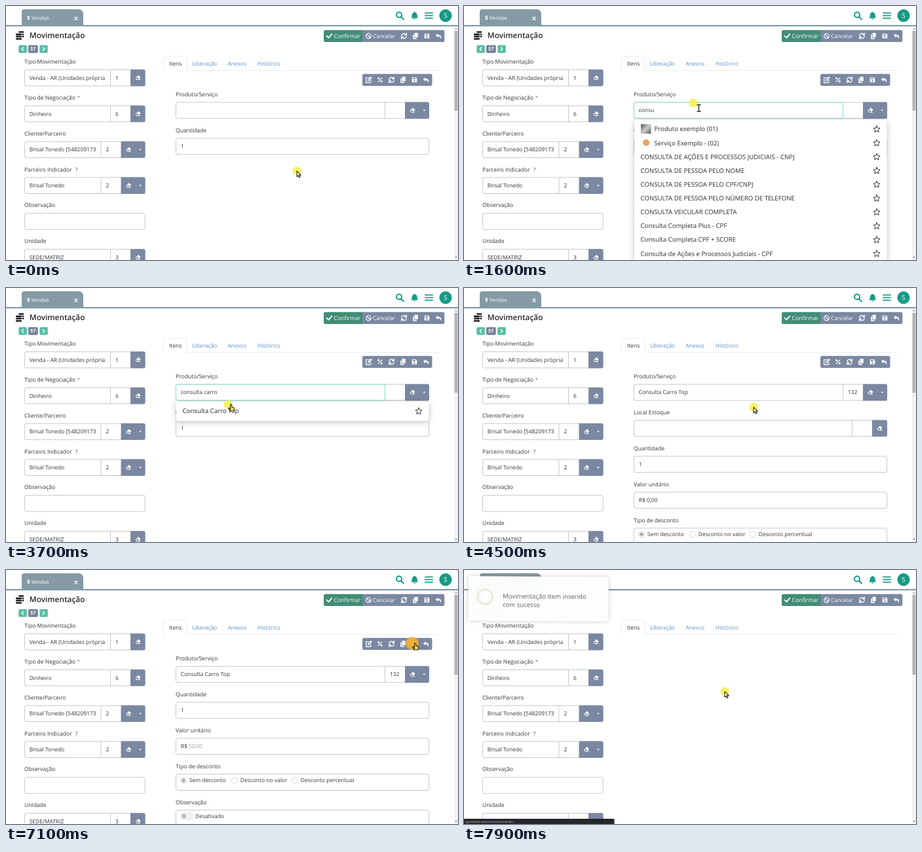
Recreate the animation shown at these times as an HTML page with a canvas. Size 690 px wide and 388 px high, loop 8 s.

```html
<!DOCTYPE html>
<html lang="pt-BR">
<head>
<meta charset="utf-8">
<style>
html, body { margin: 0; width: 100%; height: 100%; overflow: hidden; background: #fff; }
canvas { display: block; width: 690px; height: 388px; }
</style>
</head>
<body>
<canvas id="stage"></canvas>
<script>
const W = 690, H = 388, LOOP = 8000, STEP = 100;
const canvas = document.getElementById('stage');
const ctx = canvas.getContext('2d');
const ratio = window.devicePixelRatio || 1;
canvas.width = W * ratio;
canvas.height = H * ratio;

const INK = '#30353c', SLATE = '#7b88a1', TEAL = '#169a86', LINE = '#bec2c8', LINK = '#5a8fd2';
const PARTNER = 'Brisal Tonedo';

// Icon name: [stroke width, or 0 for filled, path around 0,0]
const ICONS = {
  check: [2, 'M-4 0L-1 3L4-3'],
  ban: [1.3, 'M4 0A4 4 0 1 1-4 0A4 4 0 1 1 4 0M-2.8-2.8L2.8 2.8'],
  refresh: [1.4, 'M-4-.5A4 4 0 0 1 3-2.6M4-4.5V-1.5H1M4 .5A4 4 0 0 1-3 2.6M-4 4.5V1.5H-1'],
  copy: [0, 'M-1.5-5H4V2H-1.5ZM-4-2.5H-2.3V3H2V5H-4Z'],
  save: [0, 'M-4-4H2.5L4-2.5V4H-4ZM-2.8-3V-1H1.8V-3ZM1.3 1.5A1.3 1.3 0 1 0-1.3 1.5A1.3 1.3 0 1 0 1.3 1.5'],
  undo: [0, 'M-4.5-.8L-.5-4V-2Q4.5-2 4.5 1.5Q4.5 3.5 3 4.5Q4 .8-.5 .6V2.5Z'],
  eraser: [0, 'M-4.5 1L.8-4L4.5-.5L1.2 3H4V4H-2ZM-3 1.2L-1.2-.6L1.2 1.7L0 3H-1.4Z'],
  edit: [1.2, 'M1-3.5H-4V4.5H3.5V.5M-1 1.5L-.7-.2L3.8-4.5L5-3.3L.7 1.2Z'],
  percent: [1.3, 'M-3 3L3-3M-1.4-2.5A1 1 0 1 1-3.4-2.5A1 1 0 1 1-1.4-2.5M3.4 2.5A1 1 0 1 1 1.4 2.5A1 1 0 1 1 3.4 2.5'],
  search: [2, 'M3-1A4 4 0 1 1-5-1A4 4 0 1 1 3-1M2 2L6 6'],
  bell: [0, 'M0-6Q.8-6 .8-5Q4-4.2 4 0Q4 2 5.3 3.7H-5.3Q-4 2-4 0Q-4-4.2-.8-5Q-.8-6 0-6M-1.6 4.6H1.6Q1.4 6 0 6Q-1.4 6-1.6 4.6'],
  menu: [1.8, 'M-5.5-4H5.5M-5.5 0H5.5M-5.5 4H5.5'],
  star: [1, 'M0-5L1.5-1.7L5-1.3L2.4 1.1L3.1 4.6L0 2.9L-3.1 4.6L-2.4 1.1L-5-1.3L-1.5-1.7Z'],
  coins: [2.6, 'M-.5-5.2H5M-4.8-1.6H1.8M-4.8 1.8H1.8M-4.8 5.2H1.8M4.8-1.8H5.1M4.8 1.6H5.1'],
  caret: [0, 'M-2-1H2L0 1.2Z'],
  close: [1.5, 'M-2-2L2 2M2-2L-2 2'],
  left: [1.3, 'M1.2-2.5L-1.3 0L1.2 2.5'],
  right: [1.3, 'M-1.2-2.5L1.3 0L-1.2 2.5'],
  arrow: [1.1, 'M0 0V9.2L2.1 7.3L3.7 10.6L5.3 9.8L3.8 6.7H6.6Z'],
  hand: [1.1, 'M-1 4V-3.5Q-1-5 .2-5Q1.3-5 1.3-3.5V-.5L4 0Q5 .3 5 1.5L4.2 5.5H-1.2L-4 1.5Q-3.5 .3-2.3 1.2L-1 2.3Z'],
  beam: [1.3, 'M-2.5-5H2.5M0-5V5M-2.5 5H2.5']
};
for (const k in ICONS) ICONS[k][1] = new Path2D(ICONS[k][1]);

function icon(name, x, y, color = '#fff', scale = 1, inner) {
  const [width, path] = ICONS[name];
  ctx.save();
  ctx.translate(x, y);
  ctx.scale(scale, scale);
  ctx.lineCap = ctx.lineJoin = 'round';
  if (inner) { ctx.fillStyle = inner; ctx.fill(path); }
  ctx.fillStyle = ctx.strokeStyle = color;
  if (width) { ctx.lineWidth = width; ctx.stroke(path); }
  else ctx.fill(path, 'evenodd');
  ctx.restore();
}

// y is the middle of the capitals
function text(str, x, y, size = 8.45, color = INK, weight = 400) {
  ctx.font = `${weight} ${size}px "Open Sans", "Noto Sans", sans-serif`;
  ctx.fillStyle = color;
  ctx.fillText(str, x, y + size * .35);
}

function box(x, y, w, h, fill, stroke, r = 0) {
  ctx.beginPath();
  ctx.roundRect(x, y, w, h, r);
  if (fill) { ctx.fillStyle = fill; ctx.fill(); }
  if (stroke) { ctx.strokeStyle = stroke; ctx.lineWidth = .9; ctx.stroke(); }
}

function disc(x, y, r, fill, stroke) {
  ctx.beginPath();
  ctx.arc(x, y, r, 0, Math.PI * 2);
  if (fill) { ctx.fillStyle = fill; ctx.fill(); }
  if (stroke) { ctx.strokeStyle = stroke; ctx.lineWidth = .9; ctx.stroke(); }
}

// Labelled input; code sits in its own cell, button at the right end
function field(x, right, y, label, value = '', code = null, buttonW = 0) {
  const top = y + 12.2, h = 24.6;
  text(label, x, y, 8.55);
  box(x + .4, top, right - x - .8, h, '#fff', LINE, 2.5);
  if (code !== null) {
    const bx = right - buttonW;
    box(bx, top - .4, buttonW, h + .8, SLATE, null, [0, 2.5, 2.5, 0]);
    ctx.fillStyle = LINE;
    ctx.fillRect(bx - 31, top, .9, h);
    text(code, bx - 23, top + 12.3);
    icon('eraser', bx + 11.5, top + 12, '#fff', .9);
    if (buttonW > 30) icon('caret', right - 7.5, top + 12.3);
  }
  text(value, x + 7.7, top + 12.3);
}

const productField = (value, code) => y => field(259, 646, y, 'Produto/Serviço', value, code, 37);
const stockField = y => field(259, 646, y, 'Local Estoque', '', '', 23);
const quantityField = y => field(259, 646, y, 'Quantidade', '1');
const priceField = filled => y => {
  field(259, 646, y, 'Valor unitário', filled ? 'R$' : 'R$ 0,00');
  if (filled) text('50,00', 279, y + 24.3, 8.2, '#93979d');
};
const discountField = y => {
  field(259, 646, y, 'Tipo de desconto');
  [['Sem desconto', 271], ['Desconto no valor', 349], ['Desconto percentual', 441]].forEach(([s, x], i) => {
    disc(x, y + 21.7, 4.6, i ? '#fff' : '#ededed', '#d4d6da');
    if (!i) disc(x, y + 21.7, 2.5, '#a5a8ad');
    text(s, x + 8.8, y + 21.7);
  });
};
const noteField = y => {
  field(259, 646, y, 'Observação');
  box(267, y + 17, 18, 9, '#f2f2f3', '#d0d3d7', 4.5);
  disc(271.7, y + 21.5, 3.2, '#b5b8bd');
  text('Desativado', 289, y + 21.7);
};

const QUERY = 'consulta carro';
const TYPING = [[1200, 1], [1500, 3], [1600, 5], [1800, 7], [1900, 8], [2100, 11], [2300, 13], [2400, 14]];
function typed(t) {
  let n = 0;
  for (const [at, count] of TYPING) if (t >= at) n = count;
  return QUERY.slice(0, n);
}

function form(t) {
  if (t >= 7800) return;
  box(544, 103.7, 106.5, 18.3, SLATE, null, 2.5);
  ['edit', 'percent', 'refresh', 'copy', 'save', 'undo'].forEach((n, i) => icon(n, 553.5 + i * 17.5, 112.8, '#fff', .95));

  const query = t < 4000 ? typed(t) : 'Consulta Carro Top';
  const product = productField(query, t < 4200 ? '' : '132');
  const rows = t < 4300 ? [product, quantityField]
    : t < 5000 ? [product, stockField, quantityField, priceField(false), discountField]
    : [product, quantityField, priceField(t >= 5100), discountField, noteField];
  rows.forEach((draw, i) => draw(135 + i * 54.9));

  if (t >= 900 && t < 4000) box(259.4, 147.2, 319, 24.6, null, '#86e6d3', [2.5, 0, 0, 2.5]);
  if ((t >= 700 && t < 1200) || (t >= 3000 && t < 3500)) {
    ctx.fillStyle = '#777';
    ctx.fillRect(t < 1200 ? 266.6 : 321.4, 153.5, .8, 11);
  }
}

const RESULTS = [
  'Produto exemplo (01)', 'Serviço Exemplo - (02)',
  'CONSULTA DE AÇÕES E PROCESSOS JUDICIAIS - CNPJ', 'CONSULTA DE PESSOA PELO NOME',
  'CONSULTA DE PESSOA PELO CPF/CNPJ', 'CONSULTA DE PESSOA PELO NÚMERO DE TELEFONE',
  'CONSULTA VEICULAR COMPLETA', 'Consulta Completa Plus - CPF',
  'Consulta Completa CPF + SCORE', 'Consulta de Ações e Processos Judiciais - CPF'
];

function dropdown(t) {
  const all = t >= 800 && t < 2900, one = t >= 3200 && t < 3900;
  if (!all && !one) return;
  ctx.save();
  if (t === 3200) ctx.globalAlpha = .6;
  ctx.save();
  ctx.shadowColor = 'rgba(0,0,0,.25)';
  ctx.shadowBlur = 8 * ratio;
  ctx.shadowOffsetY = 2 * ratio;
  box(260, 173.5, 385.5, all ? 230 : 29.5, '#fff', null, 2);
  ctx.restore();
  (all ? RESULTS : ['Consulta Carro Top']).forEach((s, i) => {
    const y = 188 + i * 21.13;
    text(s, all && i < 2 ? 290.5 : 269.5, y, 9.66, '#292c30');
    icon('star', 630, y, '#333');
  });
  if (all) {
    const g = ctx.createLinearGradient(270, 181, 285, 195);
    g.addColorStop(0, '#50555a');
    g.addColorStop(.5, '#c9cccd');
    g.addColorStop(1, '#5d6264');
    box(270, 180.5, 15.5, 14.5, g);
    disc(278, 208.7, 5, '#f0a268');
  }
  ctx.restore();
}

function header() {
  box(24, 5, 94, 25, '#859aa4', null, [4, 7, 0, 0]);
  ctx.fillStyle = '#7f9ca5';
  ctx.fillRect(0, 29, 690, 2);
  ctx.fillStyle = '#e6ecee';
  ctx.fillRect(0, 31, 690, 1.2);
  text('$', 32, 18, 8.5, '#fff', 700);
  text('Vendas', 39, 18, 7.9, '#fff');
  icon('close', 107, 19);
  icon('search', 601, 14.5, TEAL);
  icon('bell', 623.7, 14.7, TEAL);
  icon('menu', 645.5, 14.7, TEAL);
  disc(671, 14.7, 9.6, TEAL);
  text('S', 668.3, 14.8, 9.8, '#fff');

  icon('coins', 21, 45, '#1d1f22');
  text('Movimentação', 35.7, 45, 11.85, '#25282c', 600);
  box(485, 36.8, 60, 18.2, '#428d77', null, [2.5, 0, 0, 2.5]);
  box(544.3, 36.8, 125, 18.2, SLATE, null, [0, 2.5, 2.5, 0]);
  icon('check', 493.5, 45.8, '#fff', .95);
  text('Confirmar', 500.5, 45.8, 8.6, '#fff');
  icon('ban', 553.5, 45.8, '#fff', .95);
  text('Cancelar', 560, 45.8, 8.4, '#fff');
  ['refresh', 'copy', 'save', 'undo'].forEach((n, i) => icon(n, 607.5 + i * 17.5, 45.8, '#fff', .95));

  box(19.3, 59.7, 12.5, 12, '#58bda4', null, 2);
  box(34, 59.7, 14.7, 12, '#75819b', null, 2);
  box(51.3, 59.7, 12.5, 12, '#58bda4', null, 2);
  icon('left', 25.5, 65.7);
  icon('right', 57.5, 65.7);
  text('57', 37, 65.8, 7.4, '#fff', 700);
}

function sidebar() {
  field(28, 212.5, 85.2, 'Tipo Movimentação', 'Venda - AR (Unidades própria', '1', 22.5);
  field(28, 212.5, 140.1, 'Tipo de Negociação', 'Dinheiro', '6', 22.5);
  text('*', 108.5, 140.1, 8.4, SLATE);
  field(28, 212.5, 194.9, 'Cliente/Parceiro', PARTNER + ' [548209173', '2', 37);
  field(28, 212.5, 249.7, 'Parceiro Indicador', PARTNER, '2', 37);
  text('?', 105.8, 249.7, 8.6, SLATE, 600);
  field(28, 212.5, 304.5, 'Observação');
  field(28, 212.5, 359.4, 'Unidade', 'SEDE/MATRIZ', '3', 22.5);
}

function tabs() {
  ctx.fillStyle = '#e9ebed';
  ctx.fillRect(240, 98, 422, .9);
  box(240.4, 77, 35.6, 24, '#fff', '#e8eaec', 2.5);
  ctx.fillStyle = '#fff';
  ctx.fillRect(239.5, 98.3, 38, 4);
  text('Itens', 249, 88.2);
  text('Liberação', 284, 88.2, 8.45, LINK);
  text('Anexos', 338.5, 88.2, 8.45, LINK);
  text('Histórico', 383.7, 88.2, 8.45, LINK);
}

function scrollbar() {
  ctx.fillStyle = '#f2f2f2';
  ctx.fillRect(684, 32, 6, H - 32);
  ctx.fillStyle = '#b4b4b4';
  ctx.fillRect(684.6, 38, 4.8, 122);
  icon('caret', 687, 34.8, '#777', -.8);
  icon('caret', 687, 384, '#555', .8);
}

function toast(t) {
  if (t < 7800) return;
  ctx.save();
  ctx.globalAlpha = t < 7900 ? .5 : .97;
  ctx.translate(113.5, 44);
  ctx.rotate(.006);
  ctx.translate(-113.5, -44);
  ctx.save();
  ctx.shadowColor = 'rgba(0,0,0,.2)';
  ctx.shadowBlur = 6 * ratio;
  box(6.5, 10, 214, 68, '#fff', null, 2.5);
  ctx.restore();
  ctx.beginPath();
  ctx.arc(32, 41.5, 11.3, 0, Math.PI * 2);
  ctx.strokeStyle = '#e3ead5';
  ctx.lineWidth = 2.4;
  ctx.stroke();
  text('Movimentação Item inserido', 59, 40.3, 9.6, '#55585c');
  text('com sucesso', 59, 53.3, 9.6, '#55585c');
  ctx.restore();
  box(0, 380, 229.5, 8, '#25272a', null, [0, 1.5, 0, 0]);
  text('Aguardando demonstra.brisal.exemplo...', 2, 384.4, 4, '#d8d8d8');
}

const PATH = [
  [0, 444, 252], [400, 353, 152], [500, 353, 152], [600, 353.5, 151], [700, 353.5, 151], [800, 353, 149.3],
  [1100, 353, 149.3], [1300, 350, 148], [3100, 350, 148], [3300, 340, 176], [3600, 340, 176],
  [3700, 339, 178], [4100, 339, 178], [4500, 442, 182], [5700, 442, 182], [6000, 432, 178],
  [6300, 432, 178], [6500, 431, 177], [6600, 431, 177], [7000, 620, 112], [7200, 620, 112],
  [7500, 398.5, 186.5], [7600, 398, 185.5], [LOOP, 398, 185.5]
];

function pointer(t) {
  const i = PATH.findIndex(p => p[0] > t);
  const [t0, x0, y0] = PATH[i - 1], [t1, x1, y1] = PATH[i];
  const u = (t - t0) / (t1 - t0), e = u * u * (3 - 2 * u);
  return [x0 + (x1 - x0) * e, y0 + (y1 - y0) * e];
}

function cursor(t) {
  const [x, y] = pointer(t);
  const within = (a, b) => t >= a && t < b;
  const click = within(800, 1000) || within(3800, 3900) || within(7100, 7200);
  const r = click ? 11 : 7.6;
  const rgb = click ? '244,176,48' : '245,240,66';
  const glow = ctx.createRadialGradient(x, y, r * .75, x, y, r);
  glow.addColorStop(0, `rgba(${rgb},${click ? .92 : .82})`);
  glow.addColorStop(1, `rgba(${rgb},0)`);
  disc(x, y, r, glow);
  if (within(300, 3200)) icon('beam', x + 8.5, y + 8, '#222');
  else if (within(3200, 3900) || within(7000, 7300)) icon('hand', x + 4.5, y + 4.5, '#222', 1, '#f2df45');
  else icon('arrow', x, y, '#222', .95, '#f8f5cf');
}

function draw(now) {
  const t = Math.floor(now % LOOP / STEP) * STEP;
  ctx.setTransform(ratio, 0, 0, ratio, 0, 0);
  ctx.textRendering = 'geometricPrecision';
  ctx.fillStyle = '#fff';
  ctx.fillRect(0, 0, W, H);
  header();
  sidebar();
  tabs();
  form(t);
  dropdown(t);
  scrollbar();
  toast(t);
  cursor(t);
}

let start;
function tick(now) {
  start ??= now;
  draw(now - start);
  requestAnimationFrame(tick);
}
draw(0);
requestAnimationFrame(tick);
</script>
</body>
</html>
```
